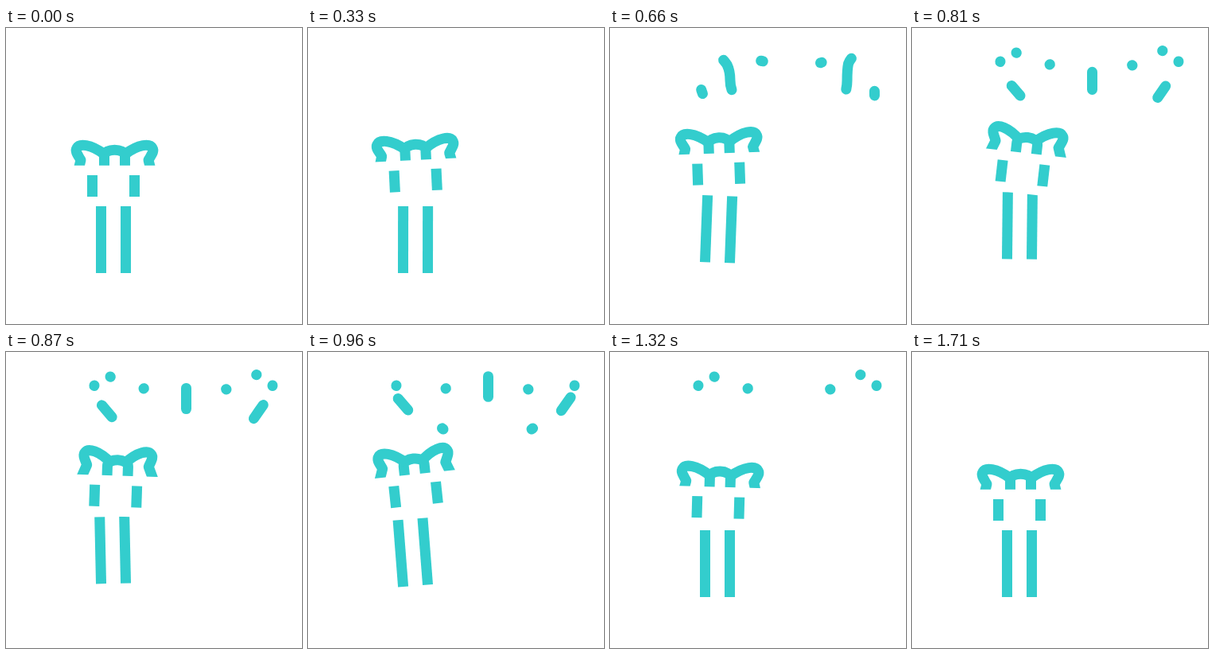
An HTML page with a canvas that plays this animation: 372 by 372 pixels, repeating every 1800 ms.

```html
<!DOCTYPE html>
<html lang="en">
<head>
<meta charset="utf-8">
<title>Gift box</title>
<style>
html, body { margin: 0; width: 100%; height: 100%; overflow: hidden; background: #fff; }
canvas { display: block; width: 372px; height: 372px; }
</style>
</head>
<body>
<canvas id="stage" width="372" height="372"></canvas>
<script>
const ctx = document.getElementById('stage').getContext('2d');
const TEAL = '#33cdcd', LINE = 13, LOOP = 1800, STEP = 30;

const ramp = (t, from, to) => Math.min(1, Math.max(0, (t - from) / (to - from)));
const smooth = u => u * u * (3 - 2 * u);

// Soft pulse: 1 at the peak time, 0 beyond the reach.
function pulse(t, peak, reach) {
  const u = Math.min(1, Math.abs(t - peak) / reach);
  return Math.cos(u * Math.PI / 2) ** 2;
}

function boxPose(t) {
  const fall = (t - 820) / 325;
  return {
    y: -17.5 * Math.max(0, 1 - fall * fall),
    turn: 2.3 * pulse(t, 610, 320) - 5.3 * pulse(t, 1020, 230)
  };
}

function lidPose(t) {
  const lift = smooth(ramp(t, 110, 580)) * (1 - ramp(t, 1110, 1620)) ** 3;
  const turn = -5.6 * pulse(t, 480, 300) + 6.5 * pulse(t, 810, 150)
    - 6.9 * pulse(t, 960, 150) + 3.55 * pulse(t, 1160, 300);
  return {
    x: 2.2 * lift + 0.27 * turn,
    y: -15.3 * lift - 4 * pulse(t, 990, 250),
    turn,
    flap: 8 * pulse(t, 885, 225)
  };
}

const loopShape = new Path2D('M90 182 L94 166 C90 159 86.5 155 89 151 C92 145 106 145.5 124 159');
const knotShape = new Path2D('M123.5 182 V161 C123.5 150.5 149.5 150.5 149.5 161 V182');

// A line drawn on by its head and wiped away by its tail.
function piece(d, show, head, tail, hide) {
  const el = document.createElementNS('http://www.w3.org/2000/svg', 'path');
  el.setAttribute('d', d);
  return { shape: new Path2D(d), length: el.getTotalLength(), show, head, tail, hide };
}
const streamer = d => piece(d, 0, [0, 215], [120, 290], 400);
const spark = d => piece(d, 130, [155, 280], [170, 310], 535);
const ray = d => piece(d, 675, [675, 1025], [835, 1175], 1180);

const burst = [
  streamer('M170 97 L161 90 C154 84 151 74 151 66 C151 57 150 52 147 46 C143 40 138 35 131 31'),
  streamer('M281 97 L291 90 C296 84 298 74 298 66 C298 57 298 52 299.5 45 C302 38 308 33 315 28.5'),
  spark('M193 42 Q183 39 173 46'),
  spark('M264 44 Q270 41 277 47'),
  spark('M117 84 Q109 64 111 42'),
  spark('M332.5 86.5 Q332 64 335 42')
];
const rays = [
  ray('M136 85 L124 71 L108 52.5'),
  ray('M308.7 87.5 L318 74 L335 50'),
  ray('M226.5 77.5 V20')
];
const BURSTS = [485, 955];

function drawPiece(p, t) {
  if (t < p.show || t >= p.hide) return;
  const dot = 0.5;
  const start = Math.min(ramp(t, ...p.tail) * p.length, p.length - dot);
  const size = Math.max(dot, ramp(t, ...p.head) * p.length - start);
  ctx.setLineDash([size, p.length * 2]);
  ctx.lineDashOffset = -start;
  ctx.stroke(p.shape);
}

function drawConfetti(t) {
  ctx.save();
  ctx.lineCap = 'round';
  for (const start of BURSTS) burst.forEach(p => drawPiece(p, t - start));
  rays.forEach(p => drawPiece(p, t));
  ctx.restore();
}

function posed(x, y, degrees, paint) {
  ctx.save();
  ctx.translate(x, y);
  ctx.rotate(degrees * Math.PI / 180);
  paint();
  ctx.restore();
}

function drawBox({ y, turn }) {
  posed(135, 307 + y, turn, () => {
    for (const x of [-22, 9]) ctx.fillRect(x, -83, LINE, 84);
  });
}

function drawBow(flap) {
  ctx.stroke(knotShape);
  for (const side of [1, -1]) {
    ctx.save();
    ctx.translate(136.5, 190);
    ctx.scale(side, 1);
    ctx.rotate(flap * Math.PI / 180);
    ctx.translate(-136.5, -190);
    ctx.stroke(loopShape);
    ctx.restore();
  }
}

function drawLid({ x, y, turn, flap }) {
  posed(135 + x, 198.5 + y, turn, () => {
    ctx.save();
    ctx.translate(-135, -198.5);
    drawBow(flap);
    ctx.restore();
    // The white lid hides the feet of the bow and the top of the box.
    ctx.fillStyle = '#fff';
    ctx.fillRect(-66, -25.7, 132, 51.2);
    ctx.fillStyle = TEAL;
    for (const left of [-33, 20]) ctx.fillRect(left, -13.5, LINE, 27);
  });
}

function draw(now) {
  const t = Math.floor((now % LOOP) / STEP + 1e-4) * STEP;
  ctx.fillStyle = '#fff';
  ctx.fillRect(0, 0, 372, 372);
  ctx.fillStyle = ctx.strokeStyle = TEAL;
  ctx.lineWidth = LINE;
  ctx.lineJoin = 'round';
  drawBox(boxPose(t));
  drawLid(lidPose(t));
  drawConfetti(t);
}

const began = performance.now();
function tick() {
  draw(performance.now() - began);
  requestAnimationFrame(tick);
}
tick();
</script>
</body>
</html>
```
